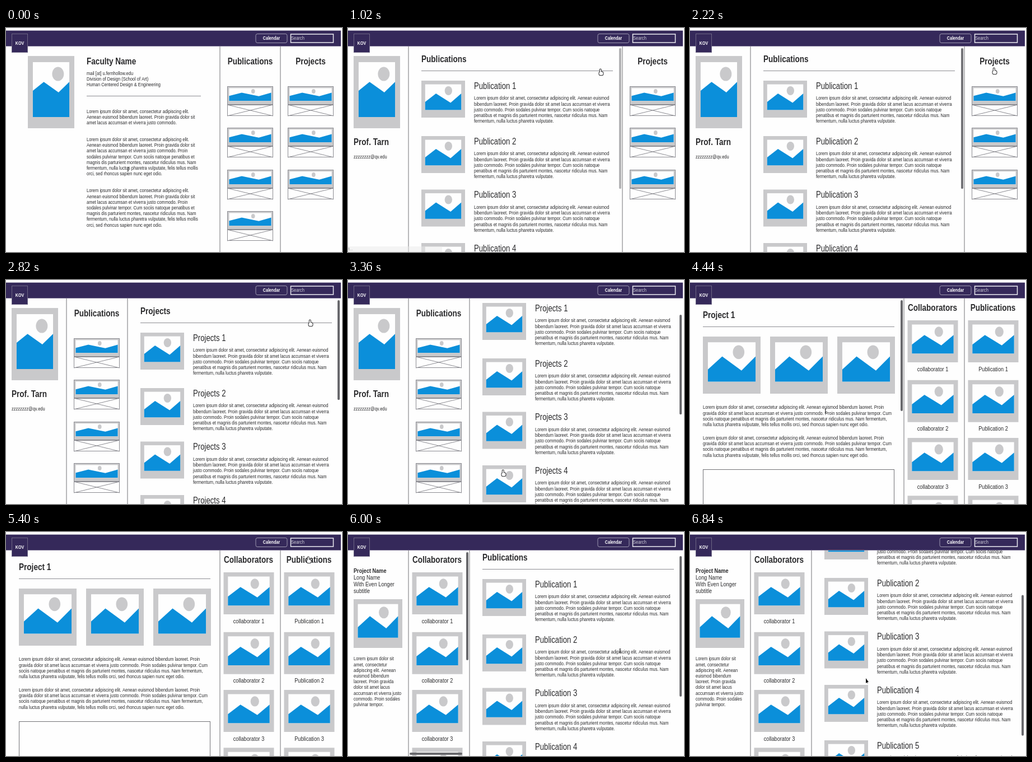
Write an HTML page with a canvas that moves like this. It is 600 px wide and 400 px high and loops after 6.9 s.

```html
<!DOCTYPE html>
<html lang="en">
<head>
<meta charset="utf-8">
<title>Three-column page walkthrough</title>
<style>
  html, body { margin: 0; width: 100%; height: 100%; overflow: hidden; background: #fefefe; }
  canvas { display: block; }
</style>
</head>
<body>
<canvas id="stage" width="600" height="400"></canvas>
<script>
const ctx = document.getElementById('stage').getContext('2d');
const LOOP = 6900, STEP = 60;
const SQUASH = 5 / 6;
const RIGHT = 598, TOP = 33, ITEM_W = 342;
const C = { paper: '#fefefe', bar: '#35295a', sand: '#c9c9cb', blue: '#0b8fda', ink: '#2a2a2c',
            line: '#727276', rule: '#8c8c92', thumb: '#68686c', edge: '#9d98b0', pale: '#ececf2' };

const OPENING = 'Lorem ipsum dolor sit amet, consectetur adipiscing elit.';
const SHORT = OPENING + '|Aenean euismod bibendum laoreet. Proin gravida dolor sit|amet lacus accumsan et viverra justo commodo.';
const LONG = SHORT + ' Proin|sodales pulvinar tempor. Cum sociis natoque penatibus et|' +
  'magnis dis parturient montes, nascetur ridiculus mus. Nam|' +
  'fermentum, nulla luctus pharetra vulputate, felis tellus mollis|orci, sed rhoncus sapien nunc eget odio.';
const ENTRY = OPENING + ' Aenean euismod|bibendum laoreet. Proin gravida dolor sit amet lacus accumsan et viverra|' +
  'justo commodo. Proin sodales pulvinar tempor. Cum sociis natoque|' +
  'penatibus et magnis dis parturient montes, nascetur ridiculus mus. Nam|fermentum, nulla luctus pharetra vulputate.';
const WIDE = OPENING + ' Aenean euismod bibendum laoreet. Proin|' +
  'gravida dolor sit amet lacus accumsan et viverra justo commodo. Proin sodales pulvinar tempor. Cum|' +
  'sociis natoque penatibus et magnis dis parturient montes, nascetur ridiculus mus. Nam fermentum,|' +
  'nulla luctus pharetra vulputate, felis tellus mollis orci, sed rhoncus sapien nunc eget odio.';
const SLIM = 'Lorem ipsum dolor sit|amet, consectetur|adipiscing elit. Aenean|euismod bibendum|laoreet. Proin gravida|' +
  'dolor sit amet lacus|accumsan et viverra justo|commodo. Proin sodales|pulvinar tempor.';

const OPEN_PUBS = 600, OPEN_PROJECTS = 2420, OPEN_PROJECT = 3980, OPEN_PROJECT_PUBS = 5440;
const SLIDE = 260, GLIDE = 360;

// Pointer stops: arrival time, place and look; it rests until the next glide
const STOPS = [
  [0, 218, 253, 'beam'], [500, 437, 60, 'hand'], [1020, 452, 79, 'hand'], [1600, 335, 225, 'beam'],
  [2220, 544, 77, 'hand'], [3360, 278, 345, 'hand'], [3900, 280, 74, 'hand'], [4440, 242, 235, 'beam'],
  [5300, 541, 50, 'hand'], [6000, 486, 213, 'beam'], [6840, 314, 266, 'arrow']
];

const ease = u => { u = Math.min(1, Math.max(0, u)); return u * u * (3 - 2 * u); };
const mix = (a, b, u) => a + (b - a) * u;
const pulse = (t, from, to) => ease((t - from) / 120) * ease((to - t) / 240);
const thereAndBack = (t, start, span) => t > start && t < start + span ? Math.sin(Math.PI * (t - start) / span) ** 2 : 0;
// hand-placed rows drift a little around an even gap
const rowY = (first, gap, i) => first + gap * i + 1.75 * Math.sin(i * Math.PI / 2);

function box(x, y, w, h, color) {
  ctx.fillStyle = color;
  ctx.fillRect(x, y, w, h);
}

function outline(x, y, w, h, color, width = 1) {
  ctx.strokeStyle = color;
  ctx.lineWidth = width;
  ctx.strokeRect(x + .5, y + .5, w - 1, h - 1);
}

function shape(points, fill) {
  ctx.beginPath();
  points.forEach(([x, y]) => ctx.lineTo(x, y));
  ctx.closePath();
  ctx.fillStyle = fill;
  ctx.fill();
}

function text(str, x, y, { size = 9.03, bold = false, align = 'left', color = C.ink, lead = 10.2 } = {}) {
  ctx.font = `${bold ? 'bold ' : ''}${size}px "Liberation Sans", Arial, sans-serif`;
  ctx.textAlign = align;
  ctx.textBaseline = 'middle';
  ctx.fillStyle = color;
  str.split('|').forEach((s, i) => {
    ctx.save();
    ctx.translate(x, y + i * lead);
    ctx.scale(SQUASH, 1);
    ctx.fillText(s, 0, 0);
    ctx.restore();
  });
}
const heading = (str, x, y, align) => text(str, x, y + .8, { size: 16.3, bold: true, align });

// Placeholder picture: grey frame, sun and two hills
function picture(x, y, w, h, { side = .087, top = .1, bottom = .79, low = .72, sun = .176, sunX = .645, sunY = .25 } = {}) {
  box(x, y, w, h, C.sand);
  const ix = x + w * side, iy = y + h * top, iw = w * (1 - 2 * side), ih = h * (bottom - top);
  box(ix, iy, iw, ih, C.paper);
  const r = ih * sun;
  ctx.beginPath();
  ctx.ellipse(ix + iw * sunX, iy + ih * sunY, r * SQUASH, r, 0, 0, 7);
  ctx.fillStyle = C.sand;
  ctx.fill();
  shape([[0, low - .03], [.3, .36], [.705, low], [1, .36], [1, 1], [0, 1]]
    .map(([u, v]) => [ix + iw * u, iy + ih * v]), C.blue);
}
const portrait = x => picture(x, 50, 83, 129,
  { side: .108, top: .085, bottom: .845, low: .55, sun: .128, sunX: .69, sunY: .215 });

function column(x0, x1, draw) {
  ctx.save();
  ctx.beginPath();
  ctx.rect(x0, TOP, x1 - x0, 400 - TOP);
  ctx.clip();
  draw(x0);
  ctx.restore();
}

function cards(title, count) {
  return x => {
    heading(title, x + 54, 60, 'center');
    for (let i = 0; i < count; i++) {
      const cx = x + 13, y = Math.round(104 + i * 74.3);
      picture(cx, y, 82, 33, { side: .042, low: .64, sunX: .57 });
      outline(cx, y, 82, 33, C.rule);
      outline(cx, y + 33, 82, 20, C.rule);
      ctx.beginPath();
      ctx.moveTo(cx, y + 33); ctx.lineTo(cx + 82, y + 53);
      ctx.moveTo(cx + 82, y + 33); ctx.lineTo(cx, y + 53);
      ctx.stroke();
    }
  };
}

function gallery(title, label) {
  return x => {
    heading(title, x + 51, 49.5, 'center');
    for (let i = 0; i < 4; i++) {
      const y = rowY(72, 105, i);
      picture(x + 6.5, y, 90, 75);
      text(`${label} ${i + 1}`, x + 51.5, y + 87.7, { size: 11, align: 'center' });
    }
  };
}

function list(title, label, count, scroll) {
  return x => {
    heading(title, x + 23, 56 - scroll);
    box(x + 23, 76 - scroll, ITEM_W, 1, C.rule);
    for (let i = 0; i < count; i++) {
      const y = rowY(94, 97.25, i) - scroll;
      picture(x + 23, y, 78, 66);
      text(`${label} ${i + 1}`, x + 117, y + 10.2, { size: 15.8 });
      text(ENTRY, x + 117, y + 32);
    }
  };
}

function faculty() {
  portrait(39);
  heading('Faculty Name', 144, 60);
  text('mail [at] u.fernhollow.edu|Division of Design (School of Art)|Human Centered Design & Engineering', 144, 81.5);
  box(144, 121, 204, 1, C.rule);
  text(SHORT, 144, 149.5);
  text(LONG, 144, 199.5);
  text(LONG, 144, 291);
}

function facultySide(u) {
  portrait(mix(39, 10, u));
  heading('Prof. Tarn', 10, 204);
  text('zzzzzzzz@qv.edu', 10, 230.5);
}

function project(scroll) {
  const y = -scroll;
  heading('Project 1', 23, 63 + y);
  box(23, 83 + y, ITEM_W, 1, C.rule);
  for (let i = 0; i < 3; i++) picture(23 + 120 * i, 101 + y, 103, 102);
  text(WIDE, 23, 228 + y);
  text(WIDE, 23, 282.5 + y);
  outline(23, 338 + y, ITEM_W, 190, C.line);
}

function projectSide() {
  text('Project Name', 10, 70, { size: 11, bold: true });
  text('Long Name|With Even Longer|subtitle', 10, 82, { size: 11, lead: 12 });
  picture(10, 120, 87, 87);
  text(SLIM, 10, 227);
}

function pill(x, y, w, h, alpha) {
  ctx.globalAlpha = alpha;
  ctx.beginPath();
  ctx.roundRect(x, y, w, h, 2);
  ctx.fillStyle = C.thumb;
  ctx.fill();
  ctx.globalAlpha = 1;
}

// The thumb's length and travel follow from the share of the page in view
function scrollbar(right, scroll, share, alpha) {
  pill(right - 6, 36 + scroll * share, 4, 364 * share, alpha);
}

function topBar() {
  box(0, 0, 600, 5, C.paper);
  box(0, 4.6, RIGHT, 28, C.bar);
  box(10, 10, 29, 34, C.bar);
  outline(10, 10, 29, 34, '#6d6684');
  const white = { size: 8.5, bold: true, align: 'center', color: '#fff' };
  text('KOV', 24.5, 27.5, white);
  ctx.beginPath();
  ctx.roundRect(446, 10.5, 56, 16, 3);
  ctx.strokeStyle = C.edge;
  ctx.lineWidth = 1;
  ctx.stroke();
  text('Calendar', 474, 18.5, white);
  outline(508, 10.5, 77, 16, C.pale, 1.5);
  text('Search', 509, 18.5, { color: '#cfcdd8' });
}

function pointer(t) {
  const next = STOPS.findIndex(s => s[0] > t);
  const to = STOPS.at(next), from = next > 0 ? STOPS[next - 1] : to;
  const u = ease((t - to[0]) / GLIDE + 1);
  const look = (u > .5 ? to : from)[3];
  ctx.save();
  ctx.translate(mix(from[1], to[1], u), mix(from[2], to[2], u));
  ctx.fillStyle = ctx.strokeStyle = C.ink;
  ctx.lineWidth = 2;
  if (look === 'beam') {
    ctx.font = '13px "Liberation Serif", serif';
    ctx.textAlign = 'center';
    ctx.fillText('I', 0, 0);
  } else if (look === 'hand') {
    ctx.beginPath();
    ctx.roundRect(-2.2, -5.5, 2, 8, 1);
    ctx.roundRect(-3.5, -.8, 7, 6, 2.5);
    ctx.stroke();
    ctx.fillStyle = '#fff';
    ctx.fill();
  } else {
    shape([[0, -5], [0, 4], [2, 2.5], [3.5, 5.5], [3, 2], [5, 2]], '#111');
  }
  ctx.restore();
}

function draw(t) {
  const slide = start => ease((t - start) / SLIDE);
  let a = 382, b = 490, left, middle, right, bars;

  if (t < OPEN_PROJECT) {
    const u = slide(OPEN_PUBS), v = slide(OPEN_PROJECTS);
    const inPubs = t >= OPEN_PUBS && t < OPEN_PROJECTS;
    const pubs = 90 * thereAndBack(t, 1260, 800), projects = 53 * thereAndBack(t, 2860, 1000);
    a = mix(a, 108, u);
    b = mix(b, 217, v);
    left = t < OPEN_PUBS ? faculty : () => facultySide(u);
    middle = inPubs ? list('Publications', 'Publication', 5, pubs) : cards('Publications', 4);
    right = t < OPEN_PROJECTS ? cards('Projects', 3) : list('Projects', 'Projects', 7, projects);
    bars = () => t < OPEN_PROJECTS
      ? scrollbar(b, pubs, .69, pulse(t, OPEN_PUBS, 1140) + pulse(t, 1200, OPEN_PROJECTS))
      : scrollbar(RIGHT, projects, .49, pulse(t, OPEN_PROJECTS, LOOP));
  } else {
    const u = slide(OPEN_PROJECT_PUBS), opened = t >= OPEN_PROJECT_PUBS;
    const page = 60 * thereAndBack(t, 4500, 600);
    const pubs = 10 * ease((t - 5820) / 180) + 101 * ease((t - 6000) / 840);
    a = mix(a, 108, u);
    b = mix(b, 217, u);
    left = opened ? projectSide : () => project(page);
    middle = gallery('Collaborators', 'collaborator');
    right = opened ? list('Publications', 'Publication', 5, pubs) : gallery('Publications', 'Publication');
    bars = () => {
      if (!opened) return scrollbar(a, page, .544, pulse(t, OPEN_PROJECT, 5400));
      const side = pulse(t, OPEN_PROJECT_PUBS, 6420);
      scrollbar(RIGHT, pubs, .69, 1);
      scrollbar(b, 0, .53, side);
      pill(a + 2, 394, 94, 4, side);
    };
  }

  box(0, 0, 600, 400, C.paper);
  column(0, a, left);
  column(a, b, middle);
  column(b, RIGHT, right);
  [a, b].forEach(x => box(x - .5, TOP, 1, 400 - TOP, C.line));
  bars();

  // link address strip, fading out after the click
  ctx.globalAlpha = pulse(t, 420, 1140);
  box(0, 390, 168, 10, '#ececec');
  text('t...', 1, 395, { size: 8 });
  ctx.globalAlpha = 1;

  topBar();
  pointer(t);
}

function tick() {
  draw(Math.floor(performance.now() % LOOP / STEP) * STEP);
  requestAnimationFrame(tick);
}
tick();
</script>
</body>
</html>
```
